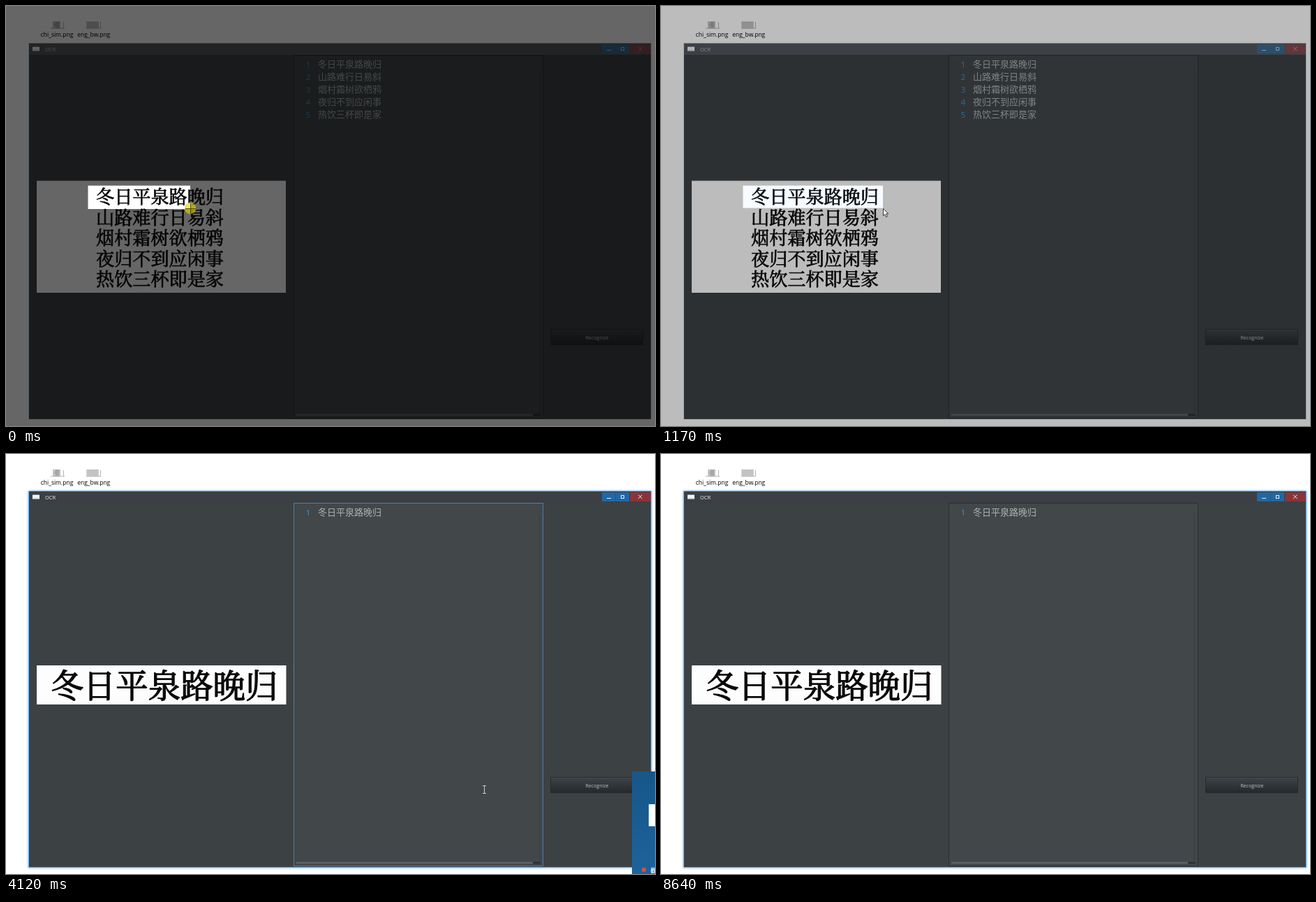
These frames come from a looping animation (930x602 px, 8800 ms). An HTML page with a canvas:

```html
<!DOCTYPE html>
<html lang="zh-CN">
<head>
<meta charset="utf-8">
<title>OCR</title>
<style>
html, body { margin: 0; width: 100%; height: 100%; overflow: hidden; background: #fff; }
canvas { display: block; }
</style>
</head>
<body>
<canvas id="stage" width="930" height="602"></canvas>
<script>
const c = document.getElementById('stage').getContext('2d');
const LOOP = 8800;
const UI = '"Open Sans", "Noto Sans", sans-serif';
const CJK = '"Noto Sans CJK SC", "Noto Sans CJK", sans-serif';
const POEM_FONT = '26.15px "Noto Serif CJK SC", "Noto Serif CJK", ' + CJK;
const POEM = ['冬日平泉路晚归', '山路难行日易斜', '烟村霜树欲栖鸦', '夜归不到应闲事', '热饮三杯即是家'];

// Pointer stops: time, x, y
const PATH = [
  [0, 264, 290], [70, 264, 290], [860, 318, 290], [1240, 318, 290], [1720, 265, 461],
  [1950, 265, 461], [2330, 342, 480], [2560, 342, 480], [2730, 666, 505], [2810, 669, 505],
  [2970, 669, 505], [3400, 838, 477], [3800, 838, 477], [4120, 685, 481], [5540, 685, 481],
  [6220, 751, 508], [6700, 751, 508], [6930, 843, 541], [7100, 843, 541], [7240, 899, 568],
  [8000, 960, 568]
];

const clamp = v => Math.max(0, Math.min(1, v));
const ramp = (t, a, b) => clamp((t - a) / (b - a));
const smooth = v => v * v * (3 - 2 * v);
const between = (t, a, b) => t >= a && t < b;
const mix = (a, b, k) => `rgb(${a.map((v, i) => Math.round(v + (b[i] - v) * k))})`;

function rect(x, y, w, h, fill) {
  c.fillStyle = fill;
  c.fillRect(x, y, w, h);
}
function frame(x, y, w, h, color, width = 1) {
  c.strokeStyle = color;
  c.lineWidth = width;
  c.strokeRect(x, y, w, h);
}
function line(color, width, ...p) {
  c.strokeStyle = color;
  c.lineWidth = width;
  c.beginPath();
  for (let i = 0; i < p.length; i += 4) {
    c.moveTo(p[i], p[i + 1]);
    c.lineTo(p[i + 2], p[i + 3]);
  }
  c.stroke();
}
function text(s, x, y, font, color, align = 'left') {
  c.font = font;
  c.fillStyle = color;
  c.textAlign = align;
  c.fillText(s, x, y);
}
function gradient(x0, y0, x1, y1, a, b) {
  const g = c.createLinearGradient(x0, y0, x1, y1);
  g.addColorStop(0, a);
  g.addColorStop(1, b);
  return g;
}
function dot(x, y, r, fill) {
  c.fillStyle = fill;
  c.beginPath();
  c.arc(x, y, r, 0, 7);
  c.fill();
}

function pointer(t) {
  const i = PATH.findIndex(p => p[0] > t);
  if (i < 0) return PATH[PATH.length - 1].slice(1);
  const [a, b] = [PATH[i - 1], PATH[i]];
  let k = ramp(t, a[0], b[0]);
  if (i > 2) k = smooth(k);
  return [a[1] + (b[1] - a[1]) * k, a[2] + (b[2] - a[2]) * k];
}

function desktop() {
  rect(0, 0, 930, 602, '#fff');
  rect(67, 22, 11, 10, '#c4c4c4');
  for (let y = 23; y < 32; y += 2) line('#8c8c8c', 1, 69 + y % 3, y + .5, 76, y + .5);
  line('#b4b4b4', 1, 64, 32, 84, 32, 82.5, 23, 82.5, 32);
  rect(115, 22, 18, 10, '#d6d6d6');
  for (let y = 23; y < 32; y += 2) line('#b0b0b0', 1, 116, y + .5, 132, y + .5);
  line('#b4b4b4', 1, 115, 32, 136, 32, 135.5, 23, 135.5, 32);
  text('chi_sim.png', 73, 44, '8.5px ' + UI, '#000', 'center');
  text('eng_bw.png', 125.7, 44, '8.5px ' + UI, '#000', 'center');
}

function titleBar(active) {
  rect(33, 53.5, 891, 16.5, mix([83, 88, 94], [60, 64, 68], active));
  rect(38, 58.5, 10, 6, '#f2f7fb');
  line('#a9c4da', .6, 39, 63, 47, 63);
  text('OCR', 56, 64.6, '7.5px ' + UI, mix([185, 190, 194], [235, 238, 240], active));
  const blue = mix([58, 108, 148], [32, 104, 164], active);
  const symbol = mix([172, 202, 224], [228, 237, 245], active);
  rect(854, 55, 19, 13, blue);
  rect(873.5, 55, 19.5, 13, blue);
  rect(894, 55, 30, 13, mix([132, 75, 80], [137, 52, 57], active));
  line(symbol, 1, 861, 63.5, 867, 63.5);
  frame(881.5, 59.5, 4, 4, symbol);
  line(mix([196, 140, 142], [240, 225, 226], active), 1, 906, 58.5, 911.5, 64, 911.5, 58.5, 906, 64);
}

// Thin outline gives the heavier strokes of scanned print
function verse(s, y) {
  text(s, 129, y, POEM_FONT, '#0a0a0a');
  c.strokeStyle = '#0a0a0a';
  c.lineWidth = .75;
  c.lineJoin = 'round';
  c.strokeText(s, 129, y);
}

function picture(cropped) {
  c.save();
  c.beginPath();
  if (cropped) {
    c.rect(44, 303, 357.5, 56);
    c.clip();
    rect(44, 303, 358, 56, '#fdfdfd');
    c.translate(44, 303);
    c.scale(1.776, 1.776);
    c.translate(-117.5, -257.5);
    verse(POEM[0], 283.4);
  } else {
    rect(44, 250.5, 357, 160.5, '#fff');
    POEM.forEach((s, i) => verse(s, 283.4 + i * 29.4));
  }
  c.restore();
}

function editor(lines, hover) {
  rect(412, 70, 358, 521, '#42474a');
  frame(412.5, 70.5, 357, 520, mix([43, 47, 50], [74, 126, 174], hover));
  line('#393d41', 1, 764.5, 86, 764.5, 583);
  rect(416, 584.5, 350, 3, '#2e3235');
  rect(416, 584.5, 339, 3, '#5c6268');
  POEM.slice(0, lines).forEach((s, i) => {
    const y = 88.3 + i * 17.9;
    text(i + 1, 433, y, '11.5px ' + UI, '#3c92cc', 'center');
    text(s, 447, y, '13px ' + CJK, '#a9b3b3');
  });
}

function button(hover, pressed) {
  const top = mix([62, 66, 71], [76, 82, 88], hover);
  rect(781, 464, 132, 22, pressed ? '#24272a' : gradient(0, 464, 0, 486, top, '#25282b'));
  frame(780.5, 463.5, 132, 22, '#282b2e');
  line('#50555a', .6, 782, 464.6, 912, 464.6);
  text('Recognize', 847, 477.6, '7px ' + UI, '#bcc1c4', 'center');
}

function appWindow(t) {
  const active = t < 8170 ? ramp(t, 1800, 1870) : t < 8500 ? 1 - ramp(t, 8170, 8260) : ramp(t, 8540, 8640);
  c.save();
  c.shadowColor = `rgba(80,165,245,${active})`;
  c.shadowBlur = 3;
  rect(32, 53, 893, 540, mix([206, 224, 241], [112, 182, 243], active));
  c.restore();
  rect(33, 54, 891, 538, '#3c4144');
  titleBar(active);
  picture(t >= 1950);
  const hover = t < 2900 ? ramp(t, 2610, 2810)
    : t < 3850 ? 1 - ramp(t, 3200, 3420)
    : t < 5000 ? ramp(t, 3900, 4120)
    : 1 - ramp(t, 6780, 6930);
  editor(t < 3810 ? 5 : 1, hover);
  button(ramp(t, 3260, 3420) - ramp(t, 3840, 3960), between(t, 3540, 3690));
}

function dim(t, x) {
  const k = t < 1015 ? 1 : 1 - ramp(t, 940, 1350);
  if (!k) return;
  const w = x - 117.5, h = t < 860 ? 33.5 : 32;
  c.fillStyle = `rgba(0,0,0,${.6 * k})`;
  c.beginPath();
  c.rect(0, 0, 930, 602);
  c.rect(117.5, 257.5, w, h);
  c.fill('evenodd');
  if (t >= 1015) rect(117.5, 257.5, w, h, `rgba(70,140,255,${.08 * k})`);
}

function cursor(t, x, y) {
  if (t < 860 || between(t, 1720, 1870) || between(t, 3540, 3690)) dot(x, y, 8.3, 'rgba(222,212,0,.65)');
  if (t < 1015) {
    line('#4c4a10', 1, x - 7, y + .5, x + 8, y + .5, x + .5, y - 7, x + .5, y + 8);
    line('#f4f08a', .6, x - 7, y - .5, x, y - .5, x - .5, y - 7, x - .5, y);
    return;
  }
  if (between(x, 413, 769) && between(y, 71, 590)) {
    line('#c9cdcf', 1, x + .5, y - 5, x + .5, y + 5,
      x - 2, y - 5.5, x + 3, y - 5.5, x - 2, y + 5.5, x + 3, y + 5.5);
    return;
  }
  c.save();
  c.translate(x + .5, y + .5);
  c.beginPath();
  [[0, 0], [0, 10], [2.3, 8], [4, 12], [5.8, 11.2], [4.1, 7.3], [7.3, 7.3]].forEach(p => c.lineTo(...p));
  c.closePath();
  c.fillStyle = '#fff';
  c.fill();
  c.strokeStyle = '#111';
  c.lineWidth = .8;
  c.stroke();
  c.restore();
}

function popup(t) {
  const shown = smooth(ramp(t, 2020, 2330)) - smooth(ramp(t, 8170, 8410));
  if (shown <= 0) return;
  c.save();
  c.translate(33 * (1 - shown), 0);
  rect(897, 455, 33, 147, gradient(0, 455, 0, 602, '#175688', '#1d639b'));
  rect(921, 502, 9, 31.5, '#fff');
  dot(914, 596, 3.2, '#d5503f');
  text('截图', 923.5, 600, 'bold 8px ' + CJK, '#fff');
  c.restore();
}

function draw(t) {
  const [x, y] = pointer(t);
  desktop();
  appWindow(t);
  dim(t, t < 1240 ? x : 318);
  cursor(t, x, y);
  popup(t);
}

const start = performance.now();
function tick() {
  draw((performance.now() - start) % LOOP);
  requestAnimationFrame(tick);
}
tick();
</script>
</body>
</html>
```
